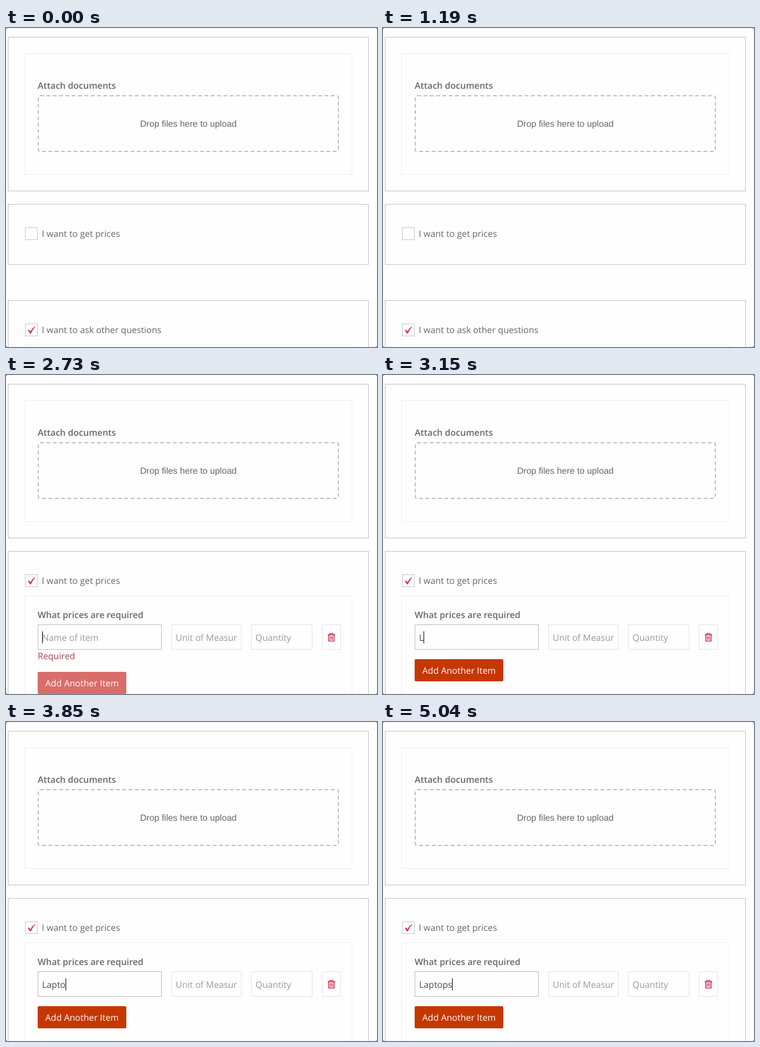
Recreate the animation shown at these times as an HTML page. Size 586 by 504 pixels, loop 5.39 s.

```html
<!DOCTYPE html>
<html lang="en">
<head>
<meta charset="utf-8">
<title>Request form</title>
<style>
  html, body { margin: 0; width: 100%; height: 100%; overflow: hidden; background: #777; }
  #stage { position: relative; width: 586px; height: 504px; overflow: hidden; background: #fefefe; border-radius: 3px; }
  svg { position: absolute; left: 0; top: 0; }
  text { font: 14px "Open Sans", sans-serif; fill: #666; text-rendering: geometricPrecision; }
  rect { fill: none; shape-rendering: crispEdges; }
  .drop { position: absolute; left: 50px; top: 106px; width: 476px; height: 90px; box-sizing: border-box; border: 2px dashed #c4c4c4; border-radius: 4px; }
  .drop-text { font-family: "Liberation Sans", Arial, sans-serif; text-anchor: middle; }
  .bold { font-weight: 600; }
  .card { stroke: #c6c6c6; }
  .panel { stroke: #f0f0f0; }
  .field { stroke: #e6e6e6; }
  .field.focus { stroke: #c2c2c2; }
  .box { stroke: #cbcbcb; }
  .hint { fill: #999; }
  .error { fill: #a94450; }
  .mark { fill: #d8325a; }
  .button rect { fill: #d96d69; shape-rendering: auto; }
  .button text { fill: #fff; }
  .button.ready rect { fill: #c63700; }
  #typed { fill: #4c4c4c; }
  #caret { fill: #111; }
</style>
</head>
<body>
<div id="stage">
  <svg width="586" height="504" viewBox="0 0 586 504">
    <defs>
      <g id="checkbox"><rect class="box" x=".5" y=".5" width="19" height="19"/></g>
      <path id="tick" class="mark" d="M4.6 10.4Q6.2 9 7 10.2L8.5 12.6Q11.4 7 15.6 4.2L16.2 4.8Q12.2 9.4 9.6 15.2Q8.2 16.2 7.4 15.2Z"/>
    </defs>

    <rect class="card" x="3.5" y="14.5" width="569" height="243"/>
    <rect class="panel" x="29.5" y="40.5" width="517" height="191"/>
    <text class="bold" x="50" y="96">Attach documents</text>
    <text class="drop-text" x="288" y="156">Drop files here to upload</text>

    <use href="#checkbox" x="30" y="315"/>
    <text x="56.5" y="330">I want to get prices</text>

    <g id="closed">
      <rect class="card" x="3.5" y="278.5" width="569" height="95"/>
      <rect class="card" x="3.5" y="430.5" width="569" height="243"/>
      <use href="#checkbox" x="30" y="467"/>
      <use href="#tick" x="30" y="467"/>
      <text x="56.5" y="482">I want to ask other questions</text>
      <rect class="panel" x="29.5" y="500.5" width="517" height="100"/>
    </g>

    <g id="open">
      <rect class="card" x="3.5" y="278.5" width="569" height="300"/>
      <use href="#tick" x="30" y="315"/>
      <rect class="panel" x="29.5" y="348.5" width="517" height="200"/>
      <text class="bold" x="50" y="384">What prices are required</text>
      <rect id="item" class="field" x="50.5" y="394.5" width="195" height="39"/>
      <rect class="field" x="261.5" y="394.5" width="110" height="39"/>
      <rect class="field" x="387.5" y="394.5" width="96" height="39"/>
      <rect class="field" x="499.5" y="394.5" width="29" height="39"/>
      <text id="hint" class="hint" x="57" y="420">Name of item</text>
      <text class="hint" x="268" y="420">Unit of Measur</text>
      <text class="hint" x="394" y="420">Quantity</text>
      <g fill="none" stroke="#c92c4f" stroke-width="1.3">
        <path d="M508 410.5H520M511.5 410V408.4H516.5V410M509.7 411V420.3H518.3V411"/>
        <path d="M512 412.5V418.5M514 412.5V418.5M516 412.5V418.5" stroke-width="1.1"/>
      </g>
      <text id="error" class="error" x="50" y="449">Required</text>
      <g id="button" class="button">
        <rect x="50" y="449" width="140" height="35" rx="2"/>
        <text x="62" y="472">Add Another Item</text>
      </g>
      <text id="typed" x="57" y="420"></text>
      <rect id="caret" x="57" y="405" width="1" height="19"/>
    </g>
  </svg>
  <div class="drop"></div>
</div>
<script>
  const LOOP = 5390, OPEN = 1680, FOCUS = 2730;
  const WORD = "Laptops";
  const KEYS = [3150, 3290, 3430, 3710, 3850, 3920, 3990];
  const $ = id => document.getElementById(id);
  const show = (id, on) => { $(id).style.display = on ? "" : "none"; };
  const typed = $("typed");

  function draw(t) {
    const count = KEYS.filter(k => t >= k).length;
    const filled = count > 0;
    show("closed", t < OPEN);
    show("open", t >= OPEN);
    show("hint", !filled);
    show("error", !filled);
    show("caret", t >= FOCUS && !(t >= 4480 && t < 5040));
    $("item").classList.toggle("focus", t >= FOCUS);
    $("button").classList.toggle("ready", filled);
    $("button").setAttribute("transform", `translate(0 ${filled ? 0 : 20})`);
    typed.textContent = WORD.slice(0, count);
    const width = filled ? typed.getComputedTextLength() : 0;
    $("caret").setAttribute("x", Math.round(57 + width));
  }

  const start = performance.now();
  function tick() {
    draw((performance.now() - start) % LOOP);
    requestAnimationFrame(tick);
  }
  tick();
</script>
</body>
</html>
```
